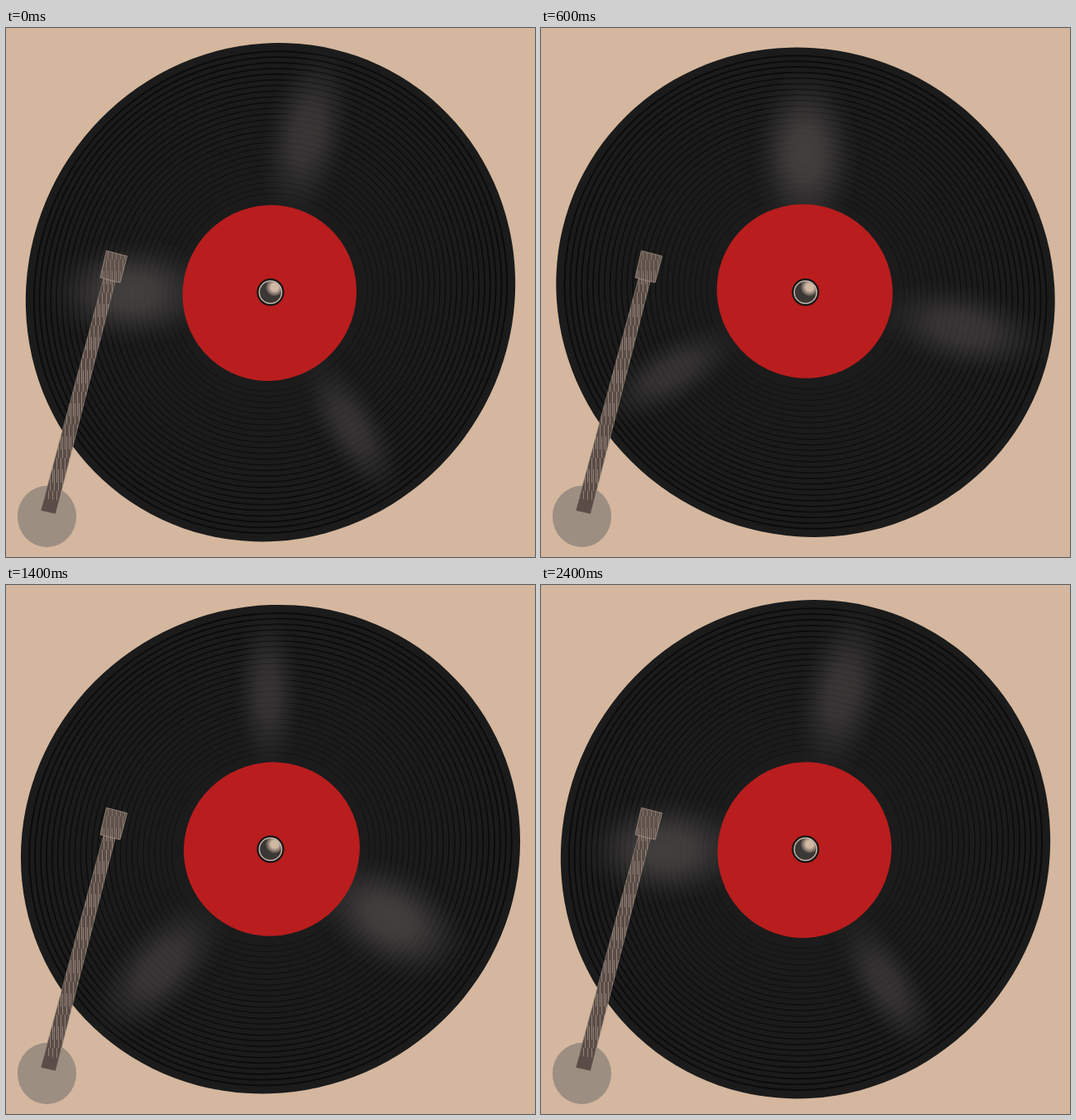
An HTML page for the animation above (2500 ms loop, 640x640 px).

```html
<!DOCTYPE html>
<html lang="en">
<head>
<meta charset="utf-8">
<title>Turntable</title>
<style>
html, body { margin: 0; width: 100%; height: 100%; overflow: hidden; background: #d4b79e; }
svg { display: block; width: 100vw; height: 100vh; }
</style>
</head>
<body>
<svg viewBox="0 0 640 640">
  <defs>
    <radialGradient id="sheen">
      <stop offset="0" stop-color="#474443" stop-opacity="1"/>
      <stop offset=".3" stop-color="#474443" stop-opacity=".88"/>
      <stop offset=".55" stop-color="#474443" stop-opacity=".5"/>
      <stop offset=".8" stop-color="#474443" stop-opacity=".14"/>
      <stop offset="1" stop-color="#474443" stop-opacity="0"/>
    </radialGradient>
    <radialGradient id="ball" gradientUnits="userSpaceOnUse" cx="5" cy="-6" r="15">
      <stop offset=".3" stop-color="#d0b8a4"/>
      <stop offset=".55" stop-color="#85766c"/>
      <stop offset=".75" stop-color="#3b3735"/>
    </radialGradient>
    <pattern id="brushed" width="5" height="40" patternUnits="userSpaceOnUse">
      <path d="M1.5 0V30M3.5 14V40" stroke="#a49386" stroke-width=".9" opacity=".8"/>
    </pattern>
  </defs>
  <rect width="640" height="640" fill="#d4b79e"/>
  <g transform="translate(320 319.7)">
    <g id="disc">
      <ellipse rx="293" ry="304.8" fill="#1b1b1b" transform="rotate(31)"/>
      <g id="grooves" fill="none" stroke="#0a0a0a" transform="rotate(31)"></g>
      <g id="shine" fill="url(#sheen)"></g>
      <ellipse rx="104.6" ry="107" fill="#ba1d1e" transform="translate(-1.2 .9) rotate(31)"/>
    </g>
    <circle r="16.6" fill="#171514"/>
    <circle r="13.6" fill="url(#ball)" stroke="#c3b4a8" stroke-width="1.5"/>
  </g>
  <ellipse cx="49.5" cy="591" rx="35.6" ry="37.2" fill="#9d8e82"/>
  <g id="arm" stroke="#a49386" stroke-width=".8">
    <path d="M118 303L132 307L60 588L42 584Z" fill="#5a4d47" stroke-opacity=".6"/>
    <path d="M121.5 269.5L146.5 276L138 308L114 302Z" fill="#5f524b"/>
  </g>
  <path d="M118 303L132 307L64 572L46 569Z" fill="url(#brushed)"/>
  <path d="M121.5 269.5L146.5 276L138 308L114 302Z" fill="url(#brushed)" opacity=".7"/>
</svg>
<script>
const STEP = 100, LOOP = 2500, TURN = 15;
const get = id => document.getElementById(id);

function add(parent, tag, attrs) {
  const el = document.createElementNS("http://www.w3.org/2000/svg", tag);
  for (const k in attrs) el.setAttribute(k, attrs[k]);
  parent.appendChild(el);
}

// A soft patch of light lying along one radius of the disc.
function reflection(deg, dist, length, width, opacity) {
  add(get("shine"), "ellipse", {
    cx: dist, rx: length, ry: width, opacity,
    transform: `rotate(${deg})`
  });
}

reflection(180, 168, 106, 66, 0.9);
reflection(283, 196, 112, 54, 0.68);
reflection(59, 190, 102, 42, 0.6);

for (let i = 0; i < 26; i++) {
  const k = 0.396 + i * 0.0228;
  add(get("grooves"), "ellipse", {
    rx: 293 * k, ry: 304.8 * k,
    "stroke-width": 1 + i * 0.04,
    opacity: 0.5 + i * 0.017
  });
}

// The disc rests for one extra beat at 1500 ms and is home again on the last beat.
function angle(t) {
  const beat = Math.floor(t / STEP);
  if (beat >= 24) return 0;
  return TURN * (beat < 15 ? beat : beat - 1);
}

function draw(t) {
  get("disc").setAttribute("transform", `rotate(${angle(t)})`);
}

let start;
function tick(now) {
  if (start === undefined) start = now;
  draw((now - start) % LOOP);
  requestAnimationFrame(tick);
}
draw(0);
requestAnimationFrame(tick);
</script>
</body>
</html>
```
